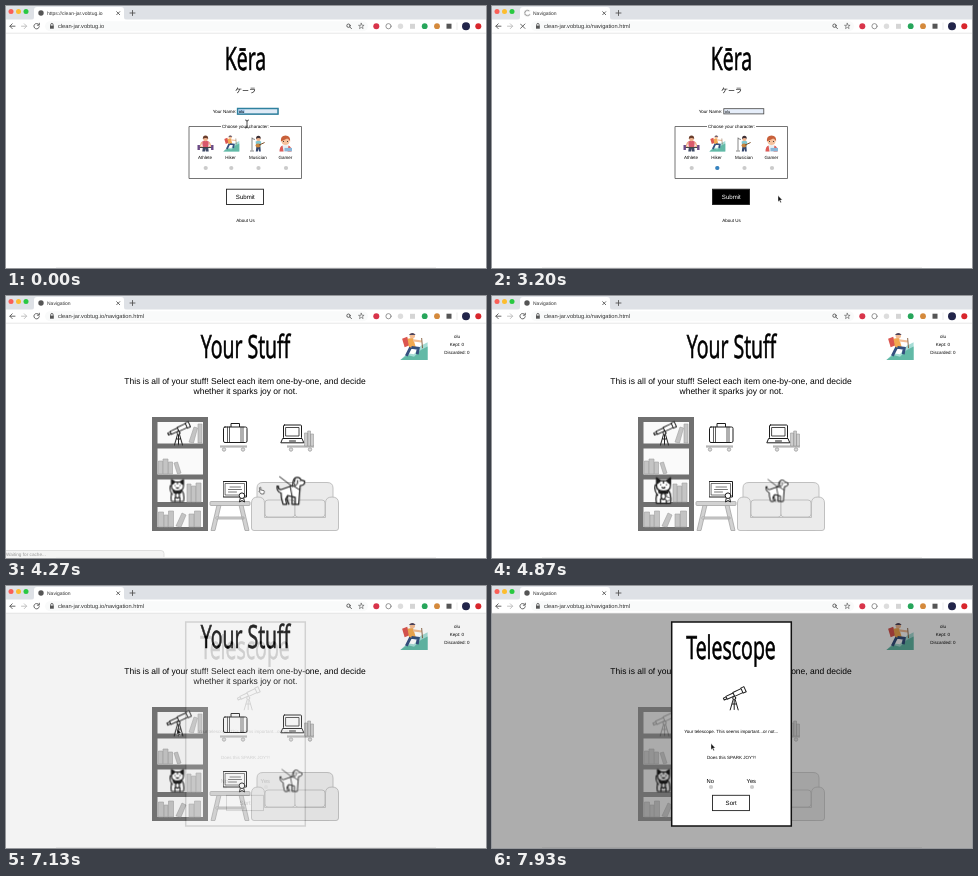
An HTML page for the animation above (8000 ms loop, 480 px wide and 262 px high).

```html
<!DOCTYPE html>
<html lang="en">
<head>
<meta charset="utf-8">
<title>Sorting your stuff</title>
<style>
html, body { margin: 0; height: 100%; overflow: hidden; background: #fff; }
svg { display: block; width: 100vw; height: 100vh; }
text { font: 4.5px "Liberation Sans", Arial, sans-serif; fill: #000; text-rendering: geometricPrecision; }
.mid text { text-anchor: middle; }
.chrome text { font-size: 5px; fill: #333; }
.chrome text.url { font-size: 5.7px; }
text.title { font: 400 32px "Open Sans", sans-serif; text-anchor: middle; stroke: #000; stroke-width: .7; }
text.kana { font: 7px "Noto Sans CJK JP", "Noto Sans CJK", sans-serif; }
text.btn { font-size: 6.1px; }
text.opt { font-size: 5.8px; }
text.lead { font-size: 8.5px; }
.line { fill: none; stroke: #222; stroke-linecap: round; stroke-linejoin: round; }
.ink { fill: #fff; stroke: #1c1c1c; stroke-linejoin: round; stroke-linecap: round; }

/* 1% of the loop is 80 ms */
.cut, .pose { animation: 8s infinite; }
.cut { animation-timing-function: step-end; }
.pose { animation-timing-function: linear; }

.oldPage { animation-name: oldPage; }
.newPage { animation-name: newPage; }
.idle { animation-name: idle; }
.busy { animation-name: busy; }
.page2 { animation-name: page2; }
.status { animation-name: status; }
.focus { animation-name: focus; }
.picked { animation-name: picked; }
@keyframes oldPage { 0% { opacity: 1 } 39.1%, 100% { opacity: 0 } }
@keyframes newPage { 0% { opacity: 0 } 39.1%, 100% { opacity: 1 } }
@keyframes idle { 0% { opacity: 1 } 32.5% { opacity: 0 } 51.6%, 100% { opacity: 1 } }
@keyframes busy { 0% { opacity: 0 } 32.5% { opacity: 1 } 51.6%, 100% { opacity: 0 } }
@keyframes page2 { 0% { opacity: 0 } 44.1%, 100% { opacity: 1 } }
@keyframes status { 0% { opacity: 0 } 45% { opacity: 1 } 58.5%, 100% { opacity: 0 } }
@keyframes focus { 0% { opacity: 1 } 13.3%, 100% { opacity: 0 } }
@keyframes picked { 0% { opacity: 0 } 13.3%, 100% { opacity: 1 } }

.spin { animation-name: spin; }
.fillHover { animation-name: fillHover; }
.textHover { animation-name: textHover; }
@keyframes spin { 0%, 39.1% { transform: rotate(0) } 51.6%, 100% { transform: rotate(500deg) } }
@keyframes fillHover { 0%, 21% { fill: #fff } 22.4%, 100% { fill: #000 } }
@keyframes textHover { 0%, 21% { fill: #000 } 22.4%, 100% { fill: #fff } }

.dog { animation-name: dog; }
.cat { animation-name: cat; }
.tele { animation-name: tele; }
@keyframes dog { 0%, 53.4% { transform: scale(1.25) } 57.5%, 100% { transform: none } }
@keyframes cat { 0%, 58.4% { transform: none } 61.5%, 64% { transform: scale(1.2) } 67%, 100% { transform: none } }
@keyframes tele { 0%, 66% { transform: none } 70.5%, 86.6% { transform: scale(1.22) } 88%, 100% { transform: scale(1.08) } }

/* the dialog opens: all four fades share one timing */
.faded { animation-name: faded; }
.paled { animation-name: paled; }
.shade { animation-name: shade; }
.modal { animation-name: modal; }
@keyframes faded { 0%, 87.8% { opacity: 1; animation-timing-function: ease } 98%, 100% { opacity: .3 } }
@keyframes paled { 0%, 87.8% { opacity: 1; animation-timing-function: ease } 98%, 100% { opacity: .65 } }
@keyframes shade { 0%, 87.8% { opacity: 0; animation-timing-function: ease } 98%, 100% { opacity: .32 } }
@keyframes modal { 0%, 87.8% { opacity: 0; animation-timing-function: ease } 98%, 100% { opacity: 1 } }

.cursor { animation-name: cursor; }
.beam { animation-name: beam; }
.arrow { animation-name: arrow; }
.hand { animation-name: hand; }
@keyframes cursor {
  0%, 5% { transform: translate(241px, 118px) }
  8% { transform: translate(238px, 130px) }
  11% { transform: translate(228px, 153px) }
  13%, 18.3% { transform: translate(225px, 162px) }
  19.1% { transform: translate(235px, 178px) }
  21.6% { transform: translate(243px, 190px) }
  22.5%, 38.4% { transform: translate(243px, 192px) }
  40%, 47% { transform: translate(286px, 190px) }
  50% { transform: translate(280px, 191px) }
  53.4% { transform: translate(253px, 191px) }
  57% { transform: translate(205px, 198px) }
  60% { transform: translate(173px, 199px) }
  63% { transform: translate(172px, 195px) }
  66% { transform: translate(172px, 165px) }
  70.5%, 92.5% { transform: translate(171px, 143px) }
  98%, 100% { transform: translate(219px, 158px) }
}
@keyframes beam { 0% { opacity: 1 } 5.8%, 100% { opacity: 0 } }
@keyframes arrow {
  0% { opacity: 0 } 5.8% { opacity: 1 } 21.4% { opacity: 0 } 35.9% { opacity: 1 }
  44.1% { opacity: 0 } 54.2% { opacity: 1 } 58.4% { opacity: 0 } 86.6%, 100% { opacity: 1 }
}
@keyframes hand {
  0% { opacity: 0 } 21.4% { opacity: 1 } 35.9% { opacity: 0 }
  44.1% { opacity: 1 } 54.2% { opacity: 0 } 58.4% { opacity: 1 } 86.6%, 100% { opacity: 0 }
}
</style>
</head>
<body>
<svg viewBox="0 0 480 262" preserveAspectRatio="none">
<defs>
  <g id="scope" class="ink">
    <path class="line" d="M-.5 1v10M-1.5 1l-3 10.4M.5 1l3 10.4M-2.5 5.500h4"/>
    <g transform="translate(0 -4.500) rotate(-25)">
      <path d="M-12-1h3v2h-3zM-9-1.600h8v3.200h-8zM-1-2.200h9v4.400h-9zM8-2.800h3.400v5.600H8z"/>
    </g>
    <circle cx="-.5" cy="-.5" r="1.500"/>
  </g>

  <g id="hiker">
    <path d="M-8 8l4-4 4 .5L4-.5l4-2V8z" fill="#a5dcd5"/>
    <path d="M-8 8l4-3 4 1 4-4 4-2V8z" fill="#62b9a6"/>
    <path d="M-7-4.500l3-1.200 1.500 5-3 1.200z" fill="#dc5650"/>
    <path d="M-3.800-4.600l3.200-.6L1 .3l-3.800.8z" fill="#f2a950"/>
    <path d="M-1.500.500L2.500 1l-.6 3.500M-2 .500L-4.500 5.500" fill="none" stroke="#34507f" stroke-width="1.700"/>
    <path d="M-.5-3.600L4.500-3" stroke="#f3bd95" stroke-width="1.200"/>
    <path d="M4.500-5l.5 6" stroke="#7a5230" stroke-width=".5"/>
    <circle cx="-1" cy="-6.300" r="1.600" fill="#f3bd95"/>
    <path d="M-3-6.700q2-2.600 4 0z" fill="#4b4560"/>
  </g>

  <g id="athlete">
    <path d="M-2.600 3h5.200l.6 5H.4L0 5l-.4 3h-2.800z" fill="#3f4a66"/>
    <path d="M-3.400-2q3.400-1.600 6.800 0L2.700 4h-5.400z" fill="#d9596c"/>
    <path d="M-3.600-1.500l-1.600 4L-3 4M3.600-1.500l1.600 4L3 4" fill="none" stroke="#f0b490" stroke-width="1.500"/>
    <path d="M-7 4H7" stroke="#444"/>
    <path d="M-8 1.600h2.400v5H-8zM5.600 1.600H8v5H5.600z" fill="#6b4a86"/>
    <circle cy="-4.600" r="2.400" fill="#f0b490"/>
    <path d="M-2.700-4.600q0-3.400 2.700-3.400t2.700 3.400q-2.500-2-5.400 0z" fill="#6a3d2c"/>
  </g>

  <g id="musician">
    <path d="M-6-6v13M-8 7.500h4M-6-5l3 1" stroke="#555" stroke-width=".7" fill="none"/>
    <path d="M-1.600 3h4l.4 5H1L.4 5l-.6 3h-2z" fill="#34456b"/>
    <path d="M-2.400-2q2.800-1.400 5.600 0l-.6 5.400h-4.400z" fill="#7fc6cf"/>
    <ellipse cy="2" rx="2.500" ry="1.900" fill="#c9853f"/>
    <path d="M1 1.600l5.600-2.600" stroke="#7a4c24"/>
    <circle cx=".4" cy="-4.600" r="2.200" fill="#f0b490"/>
    <path d="M-2-4.600q0-3.200 2.400-3.200t2.400 3q-2.400-1.400-4.800.2z" fill="#3d3035"/>
  </g>

  <g id="gamer">
    <path d="M-6 8q0-6.600 6-6.600T6 8z" fill="#e8eef2"/>
    <path d="M-6 8q0-5 3-6l1 6zM6 8q0-5-3-6l-1 6z" fill="#df5a56"/>
    <path d="M-1 4.400h7.500v3.400H-1z" fill="#8ab6d8"/>
    <circle cy="-2.400" r="4" fill="#f6c19d"/>
    <path d="M-4.600-2q-.6-6 4.600-6t4.600 6q-1-2.600-3-3-3 1.400-6.200 3z" fill="#c8603a"/>
    <path d="M-2-2h.1M2-2h.1" stroke="#333" stroke-linecap="round"/>
  </g>

  <g id="cart">
    <path d="M-14 0h27" stroke="#b5b5b5" stroke-width="2.200"/>
    <circle cx="-10" cy="3" r="1.700" fill="#ddd" stroke="#aaa"/>
    <circle cx="9" cy="3" r="1.700" fill="#ddd" stroke="#aaa"/>
  </g>
  <circle id="radio" r="2.100" fill="#cbcbcb"/>
</defs>

<rect width="480" height="262" fill="#fff"/>

<!-- first page -->
<g class="mid">
  <text class="title" transform="translate(239.5 64) scale(.61 1)">Kēra</text>
  <text class="kana" x="239.5" y="87">ケーラ</text>
  <text x="218.5" y="106.8">Your Name:</text>
  <rect x="231.8" y="102.7" width="40" height="5.2" fill="#e6eefa" stroke="#444" stroke-width=".8"/>
  <g class="cut focus">
    <rect x="231.6" y="102.5" width="40.4" height="5.6" fill="#dfeaf6" stroke="#2f819f" stroke-width="1.5"/>
    <rect x="232.6" y="103.5" width="6" height="3.7" fill="#9cc4ea"/>
  </g>
  <text x="235.5" y="106.8" style="font-size:4px">olu</text>

  <path d="M215 120.500H183V172.500H295.500V120.500H264" fill="none" stroke="#666" stroke-width=".9"/>
  <text x="239.5" y="122">Choose your character:</text>
  <use href="#athlete" x="199.5" y="137.5"/>
  <use href="#hiker" x="225.3" y="137.5"/>
  <use href="#musician" x="252" y="137.5"/>
  <use href="#gamer" x="279.5" y="137.5"/>
  <text x="199" y="153.3">Athlete</text>
  <text x="224.5" y="153.3">Hiker</text>
  <text x="252" y="153.3">Musician</text>
  <text x="279.5" y="153.3">Gamer</text>
  <use href="#radio" x="199.7" y="162"/>
  <use href="#radio" x="225.3" y="162"/>
  <use href="#radio" x="252.5" y="162"/>
  <use href="#radio" x="280" y="162"/>
  <circle class="cut picked" cx="225.3" cy="162" r="2.1" fill="#3483c2"/>

  <rect class="pose fillHover" x="220.5" y="183.2" width="37" height="15.3" stroke="#222" stroke-width=".9"/>
  <text class="btn pose textHover" x="239.3" y="193">Submit</text>
  <text x="239.5" y="216.2">About Us</text>
</g>

<!-- second page -->
<g class="cut page2">
  <rect y="27" width="480" height="235" fill="#fff"/>
  <text class="title" transform="translate(239.5 62) scale(.61 1)">Your Stuff</text>
  <g class="mid">
    <text class="lead" x="239" y="88">This is all of your stuff! Select each item one-by-one, and decide</text>
    <text class="lead" x="239.5" y="97.6">whether it sparks joy or not.</text>
    <text x="451" y="42">olu</text>
    <text x="451" y="50">Kept: 0</text>
    <text x="451" y="58">Discarded: 0</text>
  </g>
  <use href="#hiker" transform="translate(408 50.5) scale(1.7)"/>

  <g class="pose paled">
    <!-- shelf with books -->
    <rect x="146" y="121" width="56" height="114" fill="#707070"/>
    <path d="M151.500 126H197v21.500h-45.500zM151.500 152.500H197v26h-45.500zM151.500 183.500H197V206h-45.500zM151.500 211H197v20h-45.500z" fill="#fafafa"/>
    <g fill="#c4c4c4" stroke="#a0a0a0" stroke-width=".6">
      <path d="M192 128h4v19h-4zM183 146l5-15 3.500 1-4 15z"/>
      <path d="M152.500 165h4v13h-4zM157 163h5v15h-5zM162.500 166h4v12h-4zM168 167l3.500-1 3.500 11-3.500 1z"/>
      <path d="M181 188h4v18h-4zM185.500 190h4v16h-4zM190 187h5v19h-5z"/>
      <path d="M152.500 216h5v15h-5zM158 219h4v12h-4zM162.500 215h5v16h-5zM170 230l6-13 4 2-5 12zM183 218h5v13h-5zM188.500 215h6v16h-6z"/>
    </g>

    <use href="#cart" x="228" y="150.500"/>
    <use href="#cart" x="295" y="150.500"/>
    <path d="M298.500 137h3.200v13h-3.200zM301.700 135h2.800v15h-2.800zM304.500 138h3v12h-3z" fill="#ccc" stroke="#999" stroke-width=".6"/>

    <!-- table -->
    <g fill="#d2d2d2" stroke="#a5a5a5" stroke-width=".8">
      <path d="M211 209l-6 25.500h4l6-25.500zM237 209l6 25.500h-4l-6-25.500zM210 221h28v2h-28z"/>
      <rect x="204" y="205.500" width="40" height="4" rx="1"/>
    </g>

    <!-- sofa -->
    <g fill="#ebebeb" stroke="#bababa" stroke-width=".9">
      <path d="M251 212V192q0-5.500 6-5.500h64q6 0 6 5.500v20z"/>
      <path d="M255 218h68v16.500h-68z"/>
      <rect x="259" y="204" width="30" height="17" rx="3"/>
      <rect x="289" y="204" width="30" height="17" rx="3"/>
      <path d="M245.500 232V207q0-6 6.500-6t6.500 6v14.500h61V207q0-6 6.500-6t6.500 6v25q0 2.500-2.500 2.500H248q-2.500 0-2.500-2.500z"/>
    </g>
  </g>

  <!-- things to sort -->
  <g transform="translate(173 137.5)"><g class="pose faded"><g class="pose tele"><use href="#scope"/></g></g></g>
  <g class="ink">
    <path d="M225 131v-3.500h8.500v3.500" fill="none"/>
    <rect x="217.500" y="131" width="23.500" height="15.500" rx="1.500"/>
    <path d="M221.500 131v15.500M223.500 131v15.500M235 131v15.500M237 131v15.500" stroke-width=".7"/>

    <rect x="277.500" y="129" width="18" height="13.500" rx="1"/>
    <path d="M280 131.500h13v8.500h-13z" stroke-width=".8"/>
    <path d="M277 142.500h19l1.800 4.300h-22.600zM283.500 145h6"/>

    <rect x="217.500" y="185.500" width="23" height="15.500"/>
    <path d="M219.500 187.500H238.500V199H219.500zM224 191h10.500M222.500 193.500h13M222.500 196h8" stroke-width=".6"/>
    <path d="M234.500 201l-1 5 2.500-1.500 2.500 1.500-1-5z"/>
    <circle cx="236" cy="199.700" r="2.800"/>
  </g>
  <g transform="translate(171.5 194.5)"><g class="pose cat ink" stroke-width="1.100">
    <path d="M-4-1Q-7.500 4-6 11H6Q7.500 4 4-1z"/>
    <path d="M-5 4Q-8.500 0-7-5l3 1.500V1M-2.500 11V7M2.500 11V7"/>
    <path d="M-6-11l3.500 2.500h5L6-11v6.500Q6 .5 0 .5t-6-5z"/>
    <path d="M-5.500-10l2.500 2-2.500 2zM5.500-10L3-8l2.500 2zM-4 .500q4 2 8 0l-.5 1.700q-3.500 1-7 0z" fill="#1c1c1c"/>
    <path d="M-2.500-5h.1M2.500-5h.1M-1.200-2.800q1.200 1.200 2.400 0M0-8v1.500"/>
    <ellipse cy="5" rx="2" ry="2.600"/>
  </g></g>
  <g transform="translate(285.5 194.5)"><g class="pose dog ink">
    <path d="M-3 4l-.5 3 1.500 4M.5 4.500V11h2" fill="none"/>
    <path d="M-10.500-3.500Q-10.500 0-7.500-1L1-4q0-6.500 3.500-6.500 2.500 0 3 2l3 1q.5 3.500-3.500 3.500l-.5 6L5.800 11H3V5.500L-3 4l-1.700 3 1 4h-3l-1.300-5-.3-4q-3.700-1-3.200-5.500z"/>
    <path d="M3-9q-2 3 0 5.500Q5.500-5 5-8M1-4l5.500 3.500M-1-3.300l1.500 8M7-7.500h.1" stroke-width=".8"/>
    <path class="line" d="M-9.500-11L1-3" stroke-width=".8"/>
  </g></g>

  <g class="cut status">
    <path d="M-1 254.500h156q3 0 3 3v6H-1z" fill="#f4f4f4" stroke="#d5d5d5" stroke-width=".7"/>
    <text x="0" y="260.3" style="font-size:4.7px;fill:#999">Waiting for cache...</text>
  </g>
</g>

<path d="M50 261.500h380" stroke="#eee"/>
<rect class="pose shade" y="27" width="480" height="235"/>

<!-- dialog -->
<g class="pose modal">
  <rect x="179.7" y="36" width="119.6" height="204" fill="#fff" stroke="#111" stroke-width="1.5"/>
  <text class="title" transform="translate(239 73) scale(.61 1)">Telescope</text>
  <use href="#scope" x="242.7" y="112.5"/>
  <g class="mid">
    <text x="239.3" y="147.3">Your telescope. This seems important...or not...</text>
    <text x="239.3" y="173.2">Does this SPARK JOY?!</text>
    <text class="opt" x="218.3" y="197">No</text>
    <text class="opt" x="259.3" y="197">Yes</text>
    <use href="#radio" x="219" y="201"/>
    <use href="#radio" x="260" y="201"/>
    <rect x="220.5" y="209.3" width="37" height="15.3" fill="#fff" stroke="#222" stroke-width=".9"/>
    <text class="btn" x="239.2" y="219">Sort</text>
  </g>
</g>

<!-- browser bar -->
<g class="chrome">
  <rect width="480" height="14" fill="#dee1e6"/>
  <path d="M25 14q3 0 3-3V4q0-3 3-3h84q3 0 3 3v7q0 3 3 3z" fill="#fff"/>
  <rect y="13.5" width="480" height="13.5" fill="#fff"/>
  <path d="M0 27.200h480" stroke="#ddd" stroke-width=".7"/>
  <rect x="39" y="15.3" width="323" height="10" rx="5" fill="#f9fafa"/>
  <circle cx="5" cy="5.5" r="2.5" fill="#fb5f57"/>
  <circle cx="12.5" cy="5.5" r="2.5" fill="#fdbd2e"/>
  <circle cx="20" cy="5.5" r="2.5" fill="#29c941"/>

  <circle class="cut idle" cx="35" cy="7" r="2.7" fill="#555"/>
  <g transform="translate(35.5 7)"><g class="cut busy"><path class="pose spin line" d="M0-2.800A2.800 2.800 0 1 0 2.800 0" style="stroke:#777;stroke-width:.8"/></g></g>
  <g class="cut oldPage">
    <text x="41" y="9">https://clean-jar.vobtug.io</text>
    <text class="url" x="52" y="22.2">clean-jar.vobtug.io</text>
  </g>
  <g class="cut newPage">
    <text x="41" y="9">Navigation</text>
    <text class="url" x="52" y="22.2">clean-jar.vobtug.io/navigation.html</text>
  </g>

  <g class="line" style="stroke:#555;stroke-width:.9">
    <path d="M110.700 5.700l3 3m0-3l-3 3M126.500 4.500v5m-2.500-2.500h5"/>
    <path d="M9 20.200H4m2.200-2.400L3.800 20.200l2.400 2.400"/>
    <path d="M15.500 20.200h5m-2.200-2.400l2.400 2.400-2.400 2.400" stroke="#bbb"/>
    <path class="cut idle" d="M32.600 18.300a2.700 2.700 0 1 0 .7 2.400M33.300 17.200v2h-2"/>
    <path class="cut busy" d="M28.500 18l4.400 4.400m0-4.400l-4.400 4.400"/>
    <path d="M44.700 20v-1.300q0-1.300 1.200-1.300t1.200 1.300V20"/>
    <circle cx="342.5" cy="19.7" r="1.7"/>
    <path d="M343.800 21l1.700 1.700"/>
    <path d="M355.300 17.300l.8 2h2l-1.600 1.300.6 2-1.800-1.200-1.800 1.200.6-2-1.600-1.300h2z" stroke-width=".6"/>
    <circle cx="382.5" cy="20.2" r="2.6" stroke="#888"/>
  </g>
  <rect x="44" y="19.7" width="3.8" height="3" fill="#555"/>
  <circle cx="370.3" cy="20.2" r="3" fill="#d8344a"/>
  <circle cx="394.5" cy="20.2" r="2.7" fill="#ddd"/>
  <rect x="404" y="17.8" width="5" height="5" fill="#d5d5d5"/>
  <circle cx="418.7" cy="20.2" r="2.9" fill="#27a65b"/>
  <circle cx="431" cy="20.2" r="2.9" fill="#d58a3c"/>
  <rect x="440.5" y="17.7" width="5" height="5" fill="#555"/>
  <path d="M451 16.500v7.500" stroke="#ddd" stroke-width=".6"/>
  <circle cx="460" cy="20.2" r="4" fill="#22254a"/>
  <circle cx="472.3" cy="20.2" r="3" fill="#d8262c"/>
</g>

<g class="pose cursor">
  <path class="cut beam line" d="M-1.500-4q1.500 0 1.500 1.200V2.800q0 1.200-1.500 1.200M1.500-4Q0-4 0-2.800M1.500 4Q0 4 0 2.800" stroke-width=".8"/>
  <path class="cut arrow" d="M0-.5v6.200l1.400-1.300 1 2.300 1-.5-1-2.200h1.900z" fill="#111" stroke="#fff" stroke-width=".4"/>
  <path class="cut hand ink" d="M.6.500q.8-.8 1.200 0V3l3 .6q.6.200.4 1.400L4.700 7H2L0 4.300q0-.8.600-.3z" stroke-width=".6"/>
</g>
</svg>
</body>
</html>
```
